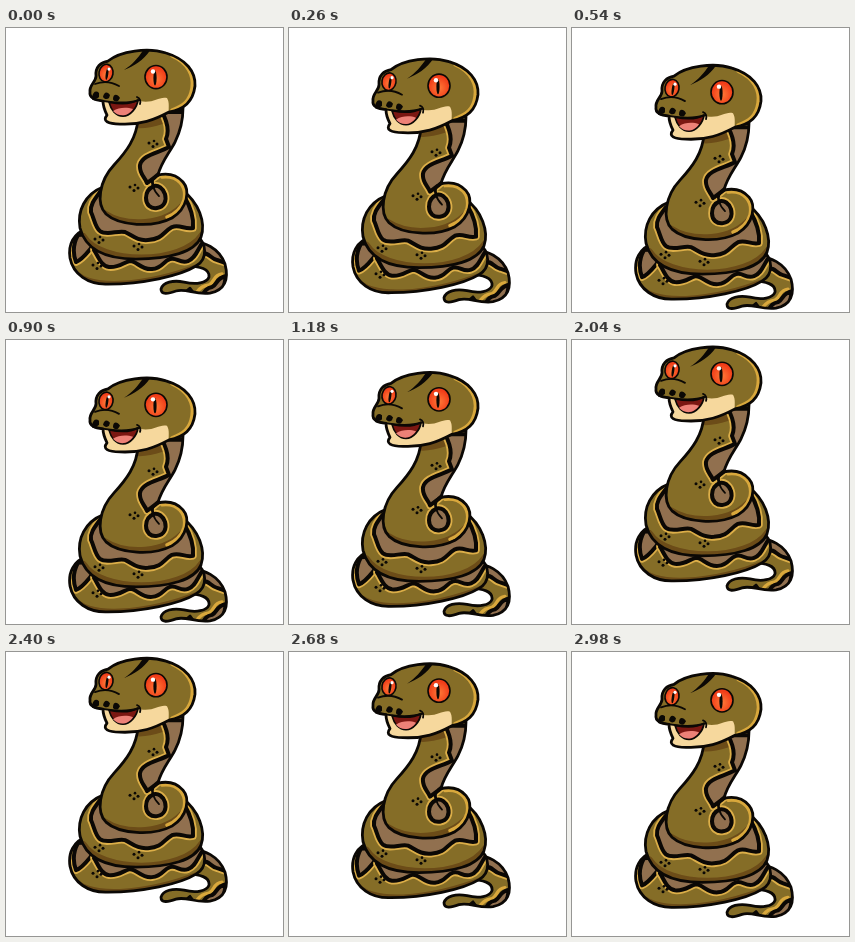
These frames come from a looping animation (277x284 px, 3 s). An HTML page:

```html
<!DOCTYPE html>
<html lang="en">
<head>
<meta charset="utf-8">
<title>Floating snake</title>
<style>
  html, body { margin: 0; width: 100%; height: 100%; overflow: hidden; background: #fff; }
  svg { display: block; width: 100%; height: 100%; }
  path, use, ellipse { stroke-linecap: round; stroke-linejoin: round; }
  .skin { fill: #856d27; }
  .line { fill: none; stroke: #0b0805; stroke-width: 2.8; }
  .thin { fill: none; stroke: #0b0805; stroke-width: 1.8; }
  .shade { fill: none; stroke: #6c4c18; stroke-width: 8; }
  .rim { fill: none; stroke: #d9a83c; stroke-width: 3.4; }
  .patch { fill: #91704f; stroke: #0b0805; stroke-width: 4; }
  .glow { fill: none; stroke: #dcae48; stroke-width: 7.6; }
  .ink { fill: #0b0805; }
</style>
</head>
<body>
<svg viewBox="0 0 277 284">
  <defs>
    <path id="tail" d="M180 216C198 210 214 222 219 236C223 251 219 262 204 265C189 267 180 260 170 263C162 266 155 267 155 261C157 254 167 252 178 254C190 257 201 255 203 249C204 241 194 238 180 238Z"/>
    <path id="low" d="M82 200C67 205 62 217 64 230C67 246 82 257 102 256C136 256 174 248 190 238C202 231 201 215 190 207Z"/>
    <path id="mid" d="M97 159C79 166 71 183 74 200C79 220 98 231 130 231C164 231 189 224 195 209C200 195 193 174 176 162Z"/>
    <path id="neck" d="M132 90C131 110 120 124 108 137C93 153 90 176 100 186C113 198 147 200 166 190C182 180 184 162 177 154C170 146 161 145 152 147C155 134 164 124 169 114C174 104 177 94 177 80Z"/>
    <path id="head" d="M84 64C83 57 90 54 90 48C89 39 95 34 102 33C114 23 142 19 160 25C180 31 190 44 189 58C187 74 178 81 163 84C148 92 135 97 114 96C102 96 96 93 101 87C99 83 97 78 97 73C89 72 83 70 84 64Z"/>
    <path id="tailPatch" d="M192 212L196 226C202 223 205 231 211 232C215 233 218 235 226 236L212 208Z"/>
    <path id="lowPatchA" d="M72 207C67 216 67 226 70 234C76 232 81 225 86 219L84 206Z"/>
    <path id="lowPatchB" d="M88 222C92 228 95 238 103 239C113 240 118 234 124 233C131 233 135 242 146 241C157 240 157 233 164 231C171 229 174 236 182 233C190 230 191 222 197 214L190 200Z"/>
    <path id="midPatch" d="M94 164C88 172 84 177 85 184C88 190 89 199 94 203C101 208 112 202 119 204C126 207 131 213 142 212C157 211 157 204 166 199C174 196 179 202 187 200C188 190 184 178 178 168Z"/>
    <path id="neckPatch" d="M156 84C162 95 163 104 160 111L163 119C152 125 136 127 134 137C133 146 139 149 141 155L149 149L178 125L190 84Z"/>
    <path id="hook" d="M148 158C143 160 140 164 140 170C140 177 145 181 151 180C158 179 161 173 159 166C157 160 152 157 148 158Z"/>
    <g id="dots" class="ink"><circle cx="-4" cy="-1" r="1.5"/><circle cx="1" cy="-3" r="1.3"/><circle cx="4" cy="0" r="1.5"/><circle cx="0" cy="2.5" r="1.5"/></g>
    <clipPath id="inTail"><use href="#tail"/></clipPath>
    <clipPath id="inLow"><use href="#low"/></clipPath>
    <clipPath id="inMid"><use href="#mid"/></clipPath>
    <clipPath id="inNeck"><use href="#neck"/></clipPath>
    <clipPath id="inHead"><use href="#head"/></clipPath>
    <radialGradient id="iris" cy=".6">
      <stop offset="0" stop-color="#ff7a38"/><stop offset="1" stop-color="#f03c18"/>
    </radialGradient>
  </defs>
  <g id="snake">
    <use href="#tail" class="skin"/>
    <g clip-path="url(#inTail)">
      <use href="#tailPatch" class="glow"/>
      <use href="#tailPatch" class="patch"/>
      <path class="rim" d="M216 246C207 247 209 254 203 257C197 258 195 259 191 264"/>
      <path class="patch" d="M220 248C210 250 212 256 206 259C201 260 199 262 196 268L216 268Z" stroke-width="3"/>
      <path class="patch" d="M178 265L184 260L190 268Z" style="stroke-width:2.5"/>
    </g>
    <use href="#tail" class="line"/>

    <use href="#low" class="skin"/>
    <g clip-path="url(#inLow)">
      <path class="shade" style="stroke-width:6" d="M66 240C77 264 140 259 196 237"/>
      <use href="#lowPatchA" class="glow"/>
      <use href="#lowPatchA" class="patch"/>
      <use href="#lowPatchB" class="glow"/>
      <use href="#lowPatchB" class="patch"/>
      <use href="#dots" x="91" y="238"/>
    </g>
    <use href="#low" class="line"/>

    <use href="#mid" class="skin"/>
    <g clip-path="url(#inMid)">
      <path class="shade" d="M77 209C94 237 176 239 197 207"/>
      <use href="#midPatch" class="glow"/>
      <use href="#midPatch" class="patch"/>
      <use href="#dots" x="93" y="212"/>
      <use href="#dots" x="132" y="219"/>
    </g>
    <use href="#mid" class="line"/>

    <use href="#neck" class="skin"/>
    <g clip-path="url(#inNeck)">
      <path class="shade" d="M98 186C120 200 160 199 179 176"/>
      <path class="shade" d="M129 96C146 98 164 89 178 82"/>
      <path class="rim" d="M156 149C172 147 181 158 178 172C175 181 169 186 161 189"/>
      <use href="#neckPatch" class="glow"/>
      <use href="#neckPatch" class="patch"/>
      <use href="#hook" class="glow"/>
      <use href="#hook" class="patch"/>
      <use href="#dots" x="147" y="116"/>
      <use href="#dots" x="128" y="160"/>
    </g>
    <use href="#neck" class="line"/>
    <path class="line" d="M152 147C147 149 145 152 147 158"/>
    <path class="thin" d="M147 158C148 162 150 165 153 168"/>

    <use href="#head" class="skin"/>
    <g clip-path="url(#inHead)">
      <path class="rim" d="M166 28C182 35 188 48 186 60C184 73 177 78 166 82"/>
      <path fill="#f6d89d" d="M94 72C110 76 122 75 134 73C147 76 153 68 161 70C164 75 162 80 163 87L135 102L90 102Z"/>
      <path class="ink" d="M118 42C128 38 138 32 145 21L138 21C132 30 127 36 118 42Z"/>
    </g>
    <use href="#head" class="line"/>
    <path class="thin" d="M89 56C97 53 106 54 113 58"/>
    <path fill="#7b1712" stroke="#0b0805" stroke-width="1.8" d="M103 74C113 76 125 76 132 72C131 80 124 88 117 88C110 88 105 82 103 74Z"/>
    <path fill="#ed8177" d="M107 83C113 79 121 79 127 81C122 89 112 89 107 83Z"/>
    <path class="thin" d="M87 71C101 74 118 77 133 72M131 69C134 70 135 73 134 76"/>
    <g class="ink">
      <path d="M86 69C87 64 90 62 93 65L93 69C91 71 88 71 86 69Z"/>
      <path d="M97 69C98 64 101 63 104 67L103 70C101 72 98 71 97 69Z"/>
      <path d="M107 71C107 66 111 65 114 70L112 73C110 74 107 73 107 71Z"/>
    </g>
    <g fill="url(#iris)" stroke="#0b0805" stroke-width="1.6">
      <ellipse cx="100" cy="45" rx="7" ry="8.8" transform="rotate(10 100 45)"/>
      <ellipse cx="150" cy="49" rx="11" ry="11.6"/>
    </g>
    <g class="ink">
      <ellipse cx="101" cy="46" rx="1.3" ry="6" transform="rotate(8 101 46)"/>
      <ellipse cx="149" cy="50" rx="1.6" ry="7.5"/>
    </g>
    <g fill="#fff">
      <circle cx="103" cy="41" r="1.6"/>
      <circle cx="147" cy="43.5" r="2.2"/>
    </g>
  </g>
</svg>
<script>
  const snake = document.getElementById('snake');
  const PERIOD = 3000, RISE = 16.7;

  function draw() {
    const y = RISE * Math.sin(performance.now() / PERIOD * 2 * Math.PI);
    snake.setAttribute('transform', `translate(0 ${y.toFixed(2)})`);
    requestAnimationFrame(draw);
  }
  draw();
</script>
</body>
</html>
```
